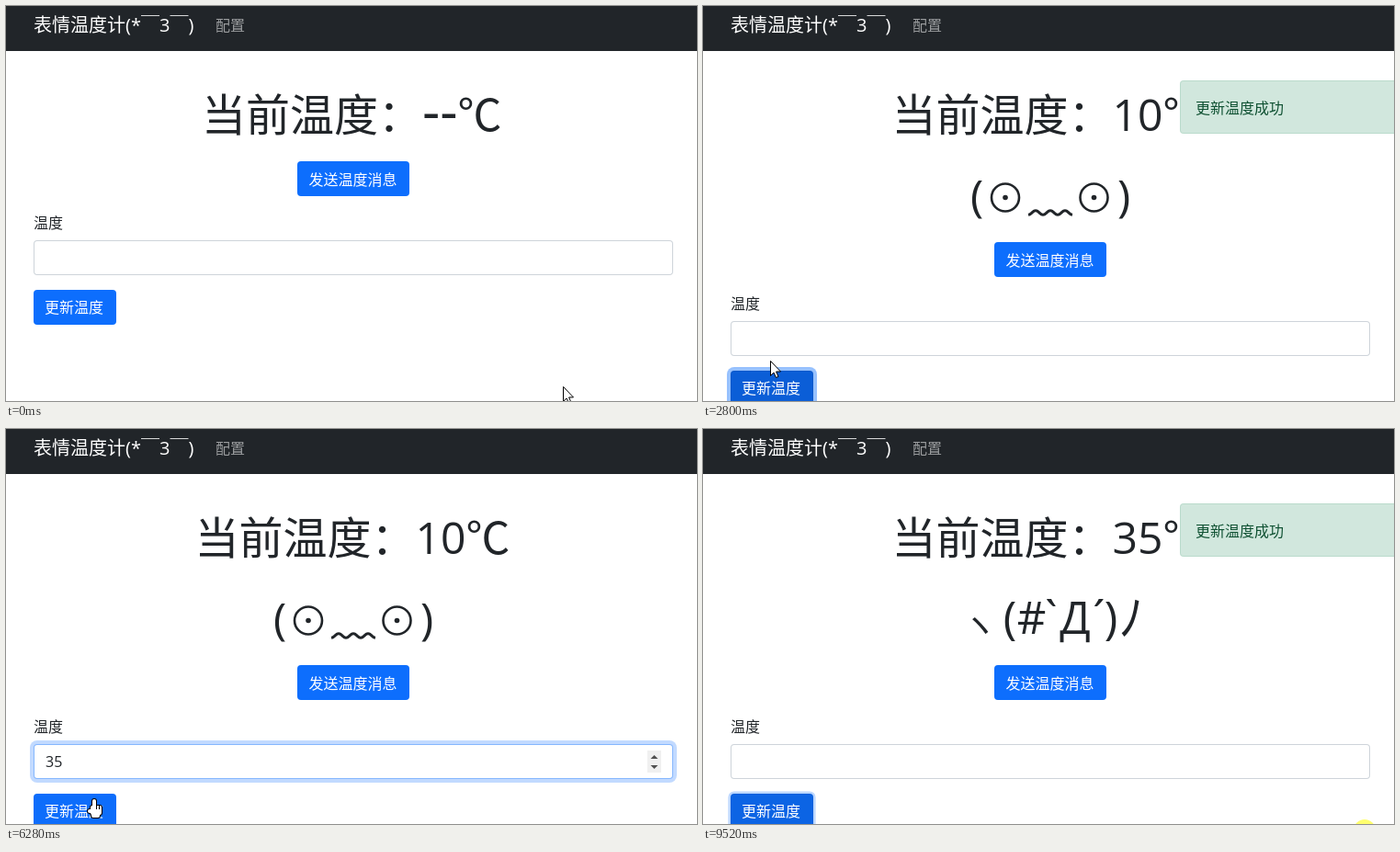
An HTML page with a canvas for the animation above (9600 ms loop, 752 by 430 pixels).

```html
<!DOCTYPE html>
<html lang="zh-CN">
<head>
<meta charset="utf-8">
<style>
html, body { margin: 0; width: 100%; height: 100%; overflow: hidden; background: #fff; }
canvas { display: block; }
</style>
</head>
<body>
<canvas id="stage" width="752" height="430"></canvas>
<script>
const ctx = document.getElementById('stage').getContext('2d');
const LOOP = 9600, TICK = 40, FADE = 150, LAG = 20, BLINK = 500, TOAST = 3040, BLUR = 9440;
const FONT = '"Open Sans", "Noto Sans CJK SC", sans-serif';
const INK = '#212529', BLUE = '#0d6efd';
const CENTER = 377;

// Each round: focus the field, type a value, press the button, show the answer
const rounds = [
  { focus: 440, text: '10', keys: [1240, 1920], hover: 2400, press: 2480, done: 2560, face: coldFace },
  { focus: 3800, text: '35', keys: [5040, 5440], hover: 6240, press: 6600, done: 6680, face: hotFace }
];
const clicks = [...rounds.flatMap(r => [r.focus, r.press]), BLUR];

// Pointer moves: start, end, destination
const home = { x: 606, y: 414 };
const moves = [
  [40, 160, 250, 284], [2080, 2480, 97, 342], [2640, 2880, 65, 402],
  [2940, 3020, 104, 331], [3380, 3540, 110, 353], [4320, 4360, 109, 340],
  [5760, 6240, 96, 402], [6440, 6520, 96, 406], [7520, 8040, 720, 437]
];

const clamp = v => Math.min(1, Math.max(0, v));
const ease = v => { v = clamp(v); return v * v * (3 - 2 * v); };
const lerp = (a, b, p) => a + (b - a) * p;
const between = (t, a, b) => t >= a && t < b;
const fadeIn = (t, start) => ease((t - start - LAG) / FADE);
const pulse = (t, on, off) => fadeIn(t, on) - fadeIn(t, off);
const sum = fn => rounds.reduce((total, r, i) => total + fn(r, i), 0);
const mix = (a, b, p) => `rgb(${a.map((v, i) => Math.round(lerp(v, b[i], p)))})`;
// The button stays active until the user clicks somewhere else
const released = i => i + 1 < rounds.length ? rounds[i + 1].focus : BLUR;

function pointerAt(t) {
  return moves.reduce((p, [start, end, x, y]) => {
    const k = ease((t - start) / (end - start));
    return { x: lerp(p.x, x, k), y: lerp(p.y, y, k) };
  }, home);
}

function text(str, x, y, size = 16, color = INK, align = 'left') {
  ctx.font = `${size}px ${FONT}`;
  ctx.fillStyle = color;
  ctx.textAlign = align;
  ctx.fillText(str, x, y);
  return ctx.measureText(str).width;
}

function box(x, y, w, h, r, color) {
  ctx.fillStyle = color;
  ctx.beginPath();
  ctx.roundRect(x, y, w, h, r);
  ctx.fill();
}

function bordered(x, y, w, h, fill, border) {
  box(x, y, w, h, 4, border);
  box(x + 1, y + 1, w - 2, h - 2, 3, fill);
}

function ring(x, y, w, h, p, rgb, alpha) {
  const s = 4 * p;
  if (s > 0) box(x - s, y - s, w + 2 * s, h + 2 * s, 4 + s, `rgba(${rgb},${alpha * p})`);
}

function disc(x, y, r, color) {
  ctx.fillStyle = color;
  ctx.beginPath();
  ctx.arc(x, y, r, 0, 7);
  ctx.fill();
}

function polygon(points, fill) {
  ctx.beginPath();
  points.forEach(([x, y]) => ctx.lineTo(x, y));
  ctx.closePath();
  ctx.fillStyle = fill;
  ctx.fill();
}

function navbar() {
  ctx.fillStyle = INK;
  ctx.fillRect(0, 0, 752, 49);
  text('表情温度计(*￣3￣)', 30, 28, 20, '#fff');
  text('配置', 228, 27, 16, '#9b9d9f');
}

function heading(value) {
  if (value) {
    text(`当前温度：${value}℃`, CENTER, 136, 48, INK, 'center');
    return;
  }
  let x = CENTER - 164;
  x += text('当前温度：', x, 136, 48);
  x += text('--', x, 136, 60);
  text('℃', x, 136, 48);
}

function coldFace() {
  text('(', 298, 224, 48, INK, 'center');
  text(')', 458, 224, 48, INK, 'center');
  ctx.strokeStyle = INK;
  for (const x of [329, 425.5]) {
    disc(x, 208.5, 2.8, INK);
    ctx.lineWidth = 2.6;
    ctx.beginPath();
    ctx.arc(x, 208.5, 15, 0, 7);
    ctx.stroke();
  }
  ctx.lineWidth = 3;
  ctx.beginPath();
  for (let x = 0; x <= 48; x++) ctx.lineTo(354 + x, 225 + 2.3 * Math.cos(x * Math.PI / 8));
  ctx.stroke();
}

function hotFace() {
  const put = (ch, x, size = 49, y = 223) => text(ch, x, y, size, INK, 'center');
  put('ヽ', 301, 38, 227);
  put('(', 334);
  put('#', 357.5);
  put('`', 379);
  put('Д', 405);
  put('´', 431);
  put(')', 444);
  put('ﾉ', 466, 54, 225);
}

function spinner(y) {
  ctx.fillStyle = '#f0f0f0';
  ctx.fillRect(698, y + 7, 15, 24);
  for (const d of [-1, 1]) {
    const base = y + 19.5 + d * 3.5;
    polygon([[701.5, base], [709.5, base], [705.5, base + d * 4]], '#505050');
  }
}

function arrow() {
  polygon([[0.5, 0.5], [0.5, 16.5], [4, 13], [6.5, 18.5], [9, 17.5], [6.6, 12], [11.5, 12]], '#fff');
  ctx.strokeStyle = '#000';
  ctx.lineWidth = 1;
  ctx.stroke();
}

function hand() {
  const parts = [[-2, 1, 4, 14], [-4, 8, 12, 10], [-3, 14, 9, 7], [-7, 12, 6, 4]];
  for (const [grow, color] of [[1, '#000'], [0, '#fff']]) {
    for (const [x, y, w, h] of parts) {
      box(x - grow, y - grow, w + 2 * grow, h + 2 * grow, 2 + grow, color);
    }
  }
  ctx.fillStyle = '#000';
  for (const x of [2, 5]) ctx.fillRect(x, 8, 1, 4);
}

function iBeam() {
  ctx.fillStyle = '#333';
  ctx.fillRect(0, -7, 1, 14);
  for (const y of [-8, 7]) {
    ctx.fillRect(-3, y, 3, 1);
    ctx.fillRect(1, y, 3, 1);
  }
}

function field(t, y, hovered) {
  const glow = sum(r => pulse(t, r.focus, r.press));
  ring(30, y, 696, 38, glow, '13,110,253', 0.25);
  bordered(30, y, 696, 38, '#fff', mix([206, 212, 218], [134, 183, 254], glow));

  const active = rounds.find(r => between(t, r.focus, r.press));
  if (active || hovered) spinner(y);
  const typing = rounds.find(r => between(t, r.focus, r.done));
  if (!typing) return;

  const pressed = typing.keys.filter(k => t >= k);
  const width = text(typing.text.slice(0, pressed.length), 43, y + 25);
  const since = t - (pressed.at(-1) ?? typing.focus);
  if (active && Math.floor(since / BLINK) % 2 === 0) {
    ctx.fillStyle = '#000';
    ctx.fillRect(43 + Math.round(width), y + 9, 1, 20);
  }
}

function updateButton(t, y) {
  const dark = sum((r, i) => pulse(t, r.hover, released(i)));
  const halo = sum((r, i) => pulse(t, r.press, released(i)));
  ring(30, y, 90, 38, halo, '49,132,253', 0.5);
  bordered(30, y, 90, 38, mix([13, 110, 253], [11, 94, 215], dark),
    mix([13, 110, 253], [10, 88, 202], dark));
  text('更新温度', 42, y + 25, 16, '#fff');
}

function toast(t) {
  const alpha = sum(r => clamp((t - r.done) / 80) - clamp((t - r.done - TOAST) / FADE));
  if (alpha <= 0) return;
  ctx.globalAlpha = alpha;
  bordered(519, 81, 260, 58, '#d1e7dd', '#badbcc');
  text('更新温度成功', 536, 116.5, 16, '#0f5132');
  ctx.globalAlpha = 1;
}

function clickMark(t) {
  const click = clicks.find(c => between(t, c, c + 160));
  if (click === undefined) return;
  const { x, y } = pointerAt(click);
  ctx.globalCompositeOperation = 'multiply';
  disc(x, y, 12, '#ffff6e');
  ctx.globalCompositeOperation = 'source-over';
}

function draw(t) {
  const answer = rounds.findLast(r => t >= r.done);
  const shift = answer ? 88 : 0;
  const fieldY = 255 + shift, buttonY = 309 + shift;
  const { x, y } = pointerAt(t);
  const over = (top, width) => between(x, 30, 30 + width) && between(y, top, top + 38);
  const inField = over(fieldY, 696);

  ctx.fillStyle = '#fff';
  ctx.fillRect(0, 0, 752, 430);
  navbar();
  heading(answer?.text);
  answer?.face();
  box(317, 169 + shift, 122, 38, 4, BLUE);
  text('发送温度消息', 329.5, 194.5 + shift, 16, '#fff');
  text('温度', 30, 241.5 + shift);
  field(t, fieldY, inField);
  updateButton(t, buttonY);
  toast(t);
  clickMark(t);

  // Typing hides the pointer until it moves again
  if (between(t, 1080, 2080)) return;
  ctx.save();
  ctx.translate(Math.round(x), Math.round(y));
  (inField ? iBeam : over(buttonY, 90) ? hand : arrow)();
  ctx.restore();
}

const origin = performance.now();
function tick() {
  const t = (performance.now() - origin) % LOOP;
  draw(Math.floor(t / TICK) * TICK);
  requestAnimationFrame(tick);
}
tick();
</script>
</body>
</html>
```
